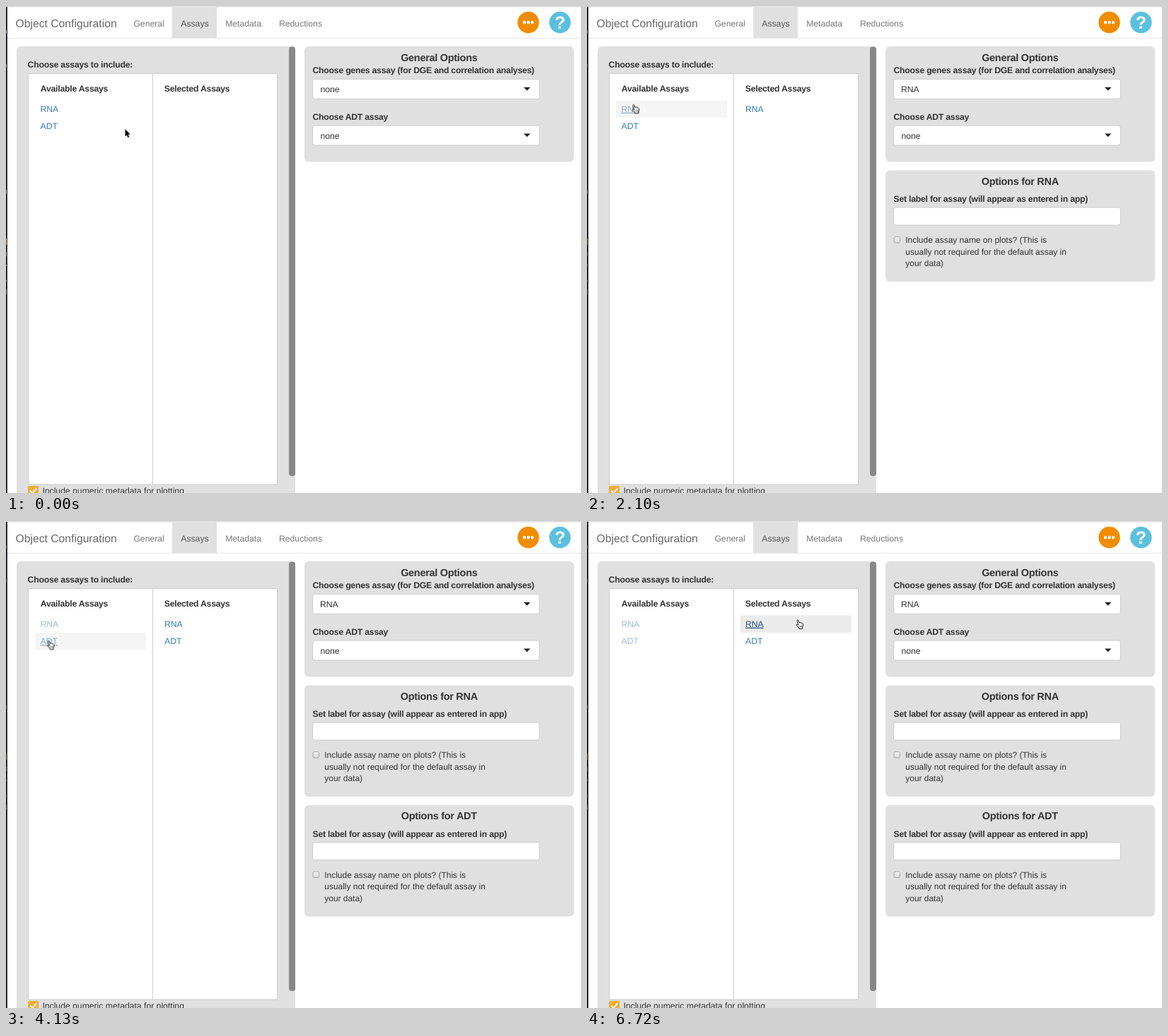
These frames come from a looping animation (813x689 px, 8000 ms). An HTML page:

```html
<!DOCTYPE html>
<html lang="en">
<head>
<meta charset="utf-8">
<title>Object Configuration</title>
<style>
html, body { margin: 0; width: 100%; height: 100%; overflow: hidden; background: #fff; }
svg { display: block; width: 813px; height: 689px; }
text { font: 12.2px "Liberation Sans", Arial, sans-serif; fill: #333; text-rendering: geometricPrecision; white-space: pre; }
.b { font-weight: bold; letter-spacing: -.017em; }
.h { font-size: 14.4px; text-anchor: middle; }
.brand { font-size: 15.7px; fill: #666; }
.tab { fill: #777; }
.note { font-size: 11.95px; }
.link { fill: #337ab7; }
.over { fill: #23527c; text-decoration: underline; }
.panel { fill: #e0e0e0; }
.field { fill: #fff; stroke: #ccc; }
.row { fill: #ebebeb; }

/* Every part shares one 8 s loop; percent = ms / 80 */
.anim { animation: 8s step-end infinite; }
.hidden { opacity: 0; }

#arrow { animation-name: arrow; }
@keyframes arrow {
  0% { transform: translate(168.5px, 174px); opacity: 1; }
  7.875% { transform: translate(168.5px, 174px); animation-timing-function: steps(6, jump-start); }
  13.125% { transform: translate(99px, 158px); animation-timing-function: steps(6, jump-start); }
  18.375%, 100% { transform: translate(67.5px, 139.5px); opacity: 0; }
  18.374% { opacity: 1; }
}
#hand { animation-name: hand, from1470; }
@keyframes hand {
  0%, 18.375% { transform: translate(64px, 138.5px); }
  21% { transform: translate(63px, 138.5px); }
  32.375% { transform: translate(63px, 138.5px); animation-timing-function: steps(6, jump-start); }
  37.625% { transform: translate(59px, 159.5px); animation-timing-function: steps(3, jump-start); }
  40.25% { transform: translate(57.5px, 167px); }
  45.5% { transform: translate(57.5px, 168.3px); }
  59.5% { transform: translate(57.5px, 168.3px); animation-timing-function: steps(2, jump-start); }
  61.25% { transform: translate(57.5px, 169.5px); }
  62.125% { transform: translate(57.5px, 169.5px); animation-timing-function: steps(4, jump-start); }
  65.625% { transform: translate(86px, 170px); animation-timing-function: steps(4, jump-start); }
  69.125% { transform: translate(145px, 169px); animation-timing-function: steps(4, jump-start); }
  72.625% { transform: translate(225px, 155px); animation-timing-function: steps(8, jump-start); }
  79.625% { transform: translate(274px, 143px); }
  81.375% { transform: translate(274px, 143px); animation-timing-function: steps(4, jump-start); }
  84.875%, 100% { transform: translate(295px, 139px); }
}
@keyframes from1470 { 0% { opacity: 0; } 18.375%, 100% { opacity: 1; } }

#click1 { animation-name: click1; }
#click2 { animation-name: click2; }
@keyframes click1 { 0% { opacity: 0; } 23.625% { opacity: 1; } 24.5%, 100% { opacity: 0; } }
@keyframes click2 { 0% { opacity: 0; } 48.125% { opacity: 1; } 49.875%, 100% { opacity: 0; } }

#edge { animation-name: edge; }
@keyframes edge { 0% { opacity: 1; } 23.625%, 100% { opacity: .5; } }

/* Rows fade once chosen */
#rna { animation-name: usedRna; }
#adt { animation-name: usedAdt; }
@keyframes usedRna { 0% { opacity: 1; } 25.375%, 100% { opacity: .5; } }
@keyframes usedAdt { 0% { opacity: 1; } 50.75%, 100% { opacity: .5; } }

#overRna { animation-name: overRna; }
#overAdt { animation-name: overAdt; }
#overPick { animation-name: overPick; }
@keyframes overRna { 0% { opacity: 0; } 23.625% { opacity: 1; } 38.5%, 100% { opacity: 0; } }
@keyframes overAdt { 0% { opacity: 0; } 38.5% { opacity: 1; } 70.875%, 100% { opacity: 0; } }
@keyframes overPick { 0% { opacity: 0; } 71.75%, 100% { opacity: 1; } }

#pickRna { animation-name: pickRna; }
#pickAdt { animation-name: pickAdt; }
@keyframes pickRna { 0% { opacity: 0; } 25.375%, 100% { opacity: 1; } }
@keyframes pickAdt { 0% { opacity: 0; } 50.75%, 100% { opacity: 1; } }

.cardRna { animation-name: cardRna; }
.cardAdt { animation-name: cardAdt; }
.unset { animation-name: unset1; }
@keyframes cardRna { 0% { opacity: 0; } 26.25%, 100% { opacity: 1; } }
@keyframes cardAdt { 0% { opacity: 0; } 51.625%, 100% { opacity: 1; } }
@keyframes unset1 { 0% { opacity: 1; } 26.25%, 100% { opacity: 0; } }
</style>
</head>
<body>
<svg viewBox="0 0 813 689">
  <defs>
    <linearGradient id="shade" x2="0" y2="1">
      <stop stop-color="#f8f8f8"/><stop offset="1" stop-color="#d8d8d8"/>
    </linearGradient>
    <g id="select">
      <rect class="field" x="433.5" y="103.5" width="321" height="28" rx="3"/>
      <path d="M732 115h9.4l-4.7 4.8z" fill="#222"/>
    </g>
    <g id="options">
      <rect class="panel" x="422" y="232.5" width="381" height="157.5" rx="6"/>
      <text class="b" x="433.5" y="277">Set label for assay (will appear as entered in app)</text>
      <rect class="field" x="433.5" y="285" width="321" height="25" rx="3"/>
      <rect x="434" y="326.5" width="8.5" height="8.5" rx="2" fill="url(#shade)" stroke="#a6a6a6"/>
      <text class="note" x="450.3" y="335.3">Include assay name on plots? (This is</text>
      <text class="note" x="450.3" y="351.7">usually not required for the default assay in</text>
      <text class="note" x="450.3" y="368">your data)</text>
    </g>
  </defs>

  <rect width="813" height="689" fill="#fff"/>

  <!-- Navigation bar -->
  <rect x="235" y="2" width="63" height="43" fill="#e0e0e0"/>
  <path d="M2 45.5H813" stroke="#e7e7e7"/>
  <rect width="813" height="1.6" fill="#dcdcdc"/>
  <text class="brand" x="13.6" y="29.6">Object Configuration</text>
  <text class="tab" x="180.4" y="28.8">General</text>
  <text x="247.3" y="28.8" style="fill:#555">Assays</text>
  <text class="tab" x="310.2" y="28.8">Metadata</text>
  <text class="tab" x="386" y="28.8">Reductions</text>
  <circle cx="738.5" cy="23.2" r="15.2" fill="#f08c00"/>
  <path d="M733 23.2h0m5.5 0h0m5.5 0h0" stroke="#fff" stroke-width="4.4" stroke-linecap="round"/>
  <circle cx="783.3" cy="23.2" r="15.2" fill="#5bc0de"/>
  <text class="b" x="783.3" y="32" style="font-size:25px;fill:#fff;text-anchor:middle">?</text>

  <!-- Window behind the left edge -->
  <rect y="1" width="1.8" height="688" fill="#10101a"/>
  <g id="edge" class="anim">
    <path d="M.5 34v5M.5 82v5M.5 260v6M.5 348v6M.5 366v2M.5 388v2M.5 401v7" stroke="#66707c"/>
    <path d="M.7 329v9" stroke="#b8781e" stroke-width="1.4"/>
  </g>

  <!-- Assay picker -->
  <path class="panel" d="M15 689V63a6 6 0 0 1 6-6H403a6 6 0 0 1 6 6V689z"/>
  <rect x="400" y="57.5" width="9" height="607.5" rx="4" fill="#888"/>
  <text class="b" x="30.6" y="86.6">Choose assays to include:</text>
  <path class="field" d="M31.5 95.5H383.5V677H31.5zM207.5 95.5V677"/>
  <text class="b" x="48.8" y="121.2">Available Assays</text>
  <text class="b" x="223.8" y="121.2">Selected Assays</text>

  <g id="rna" class="anim">
    <text class="link" x="48.4" y="149.8">RNA</text>
    <g id="overRna" class="anim hidden">
      <rect class="row" x="41" y="133.5" width="157" height="24.5"/>
      <text class="over" x="48.4" y="149.8">RNA</text>
    </g>
  </g>
  <g id="adt" class="anim">
    <text class="link" x="48.6" y="174.3">ADT</text>
    <g id="overAdt" class="anim hidden">
      <rect class="row" x="41" y="158" width="157" height="24.5"/>
      <text class="over" x="48.6" y="174.3">ADT</text>
    </g>
  </g>
  <text id="pickRna" class="link anim hidden" x="223.9" y="149.8">RNA</text>
  <text id="pickAdt" class="link anim hidden" x="224.1" y="174.3">ADT</text>
  <g id="overPick" class="anim hidden">
    <rect class="row" x="216.5" y="133.5" width="157.5" height="24.5"/>
    <text class="over" x="223.9" y="149.8">RNA</text>
  </g>

  <rect x="31" y="679" width="15" height="15" rx="2" fill="#f0ad35"/>
  <path d="M34 685.5l3.4 3.4 5.8-6.4" fill="none" stroke="#fff" stroke-width="2"/>
  <text x="51.4" y="689.8">Include numeric metadata for plotting</text>

  <!-- Option cards -->
  <rect class="panel" x="422" y="57" width="381" height="163.5" rx="6"/>
  <text class="b h" x="612.3" y="78">General Options</text>
  <text class="b" x="433.5" y="94.8">Choose genes assay (for DGE and correlation analyses)</text>
  <use href="#select"/>
  <text class="anim unset" x="444.4" y="122">none</text>
  <text class="anim cardRna hidden" x="444" y="122">RNA</text>
  <text class="b" x="433.5" y="161">Choose ADT assay</text>
  <use href="#select" y="65.5"/>
  <text x="444.4" y="188.2">none</text>

  <g class="anim cardRna hidden">
    <use href="#options"/>
    <text class="b h" x="612.3" y="252.8">Options for RNA</text>
  </g>
  <g class="anim cardAdt hidden">
    <use href="#options" y="169.5"/>
    <text class="b h" x="612.3" y="422.3">Options for ADT</text>
  </g>

  <!-- Pointer -->
  <g fill="none" stroke="#333" stroke-width="1.5">
    <circle id="click1" class="anim hidden" cx="67" cy="143" r="23"/>
    <circle id="click2" class="anim hidden" cx="61" cy="168.5" r="23"/>
  </g>
  <path id="arrow" class="anim" d="M0 0V10.6L2.3 8.5 3.9 12.2 5.8 11.4 4.2 7.8H7.2z" fill="#000" stroke="#fff" stroke-width="1" paint-order="stroke"/>
  <g id="hand" class="anim hidden" stroke="#111" stroke-linejoin="round">
    <path d="M4 8.4 2 2.4C1.6 1 3.2.5 3.8 1.8L5.2 5.2C5.7 4.5 6.9 4.7 7.1 5.4 7.7 4.8 8.7 5.1 8.9 5.8 9.7 5.4 10.4 6 10.5 6.9 10.7 8.9 10.3 10.4 9.6 11.6V13.3H5V12C3.6 11 2 9.7 1.1 8.6.5 7.6 1.7 6.9 2.5 7.5z" fill="#fff"/>
    <path d="M5.9 8.8v2.2M7.4 8.8v2.2M8.8 8.8v2.2" stroke-width=".6"/>
  </g>
</svg>
</body>
</html>
```
